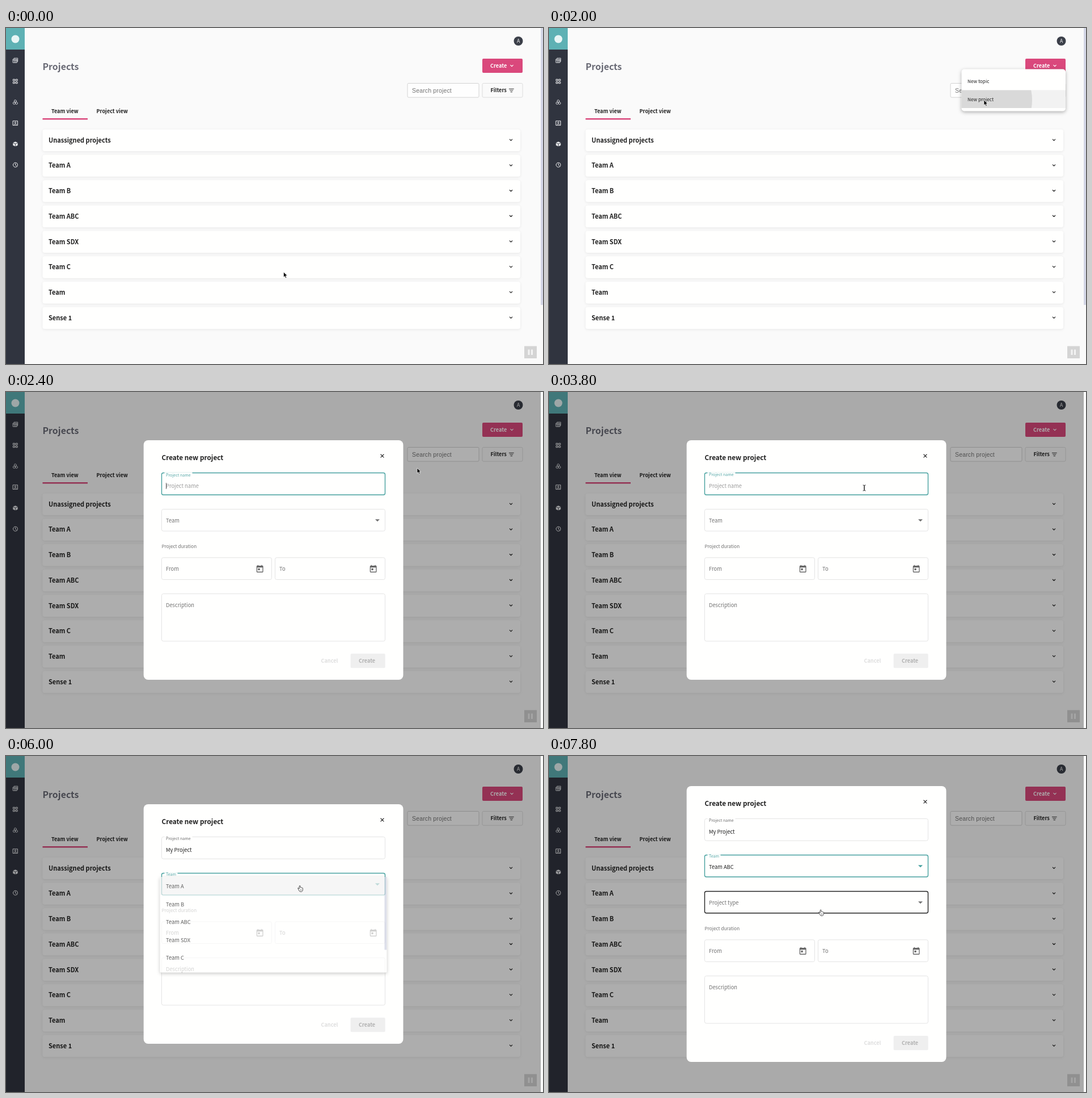
An HTML page that plays this animation: 947x592 px, repeating every 8 s.

```html
<!DOCTYPE html>
<html lang="en">
<head>
<meta charset="utf-8">
<title>Create new project</title>
<style>
  html, body { margin: 0; width: 100%; height: 100%; overflow: hidden; background: #fafafa; }
  svg { display: block; width: 947px; height: 592px; }
  text { font-family: "Noto Sans CJK JP", "Noto Sans CJK SC", "Noto Sans CJK", "Noto Sans", sans-serif; white-space: pre; }
  .search { font-family: "Liberation Sans", Arial, sans-serif; letter-spacing: .15px; }
  .row { fill: #fffffe; filter: drop-shadow(0 1.5px 2px rgba(0, 0, 0, .08)); }
  .popup { fill: #fffffe; filter: drop-shadow(0 2px 3px rgba(0, 0, 0, .3)); }
  .line { fill: none; stroke-linecap: round; stroke-linejoin: round; }
</style>
</head>
<body>
<svg viewBox="0 0 947 592">
  <defs>
    <clipPath id="menuRow"><rect x="727.5" y="109.5" width="183.5" height="31.5"/></clipPath>
    <clipPath id="listRow"><rect x="271.5" y="276.5" width="396" height="31.5"/></clipPath>
    <clipPath id="button"><rect x="840" y="54" width="71" height="25" rx="2"/></clipPath>
  </defs>
  <g id="page"></g>
  <g id="scene"></g>
</svg>
<script>
const STEP = 200, LOOP = 8000;
const PINK = '#da487c', TEAL = '#45a09e', INK = '#202020', GREY = '#717171';

const text = (x, y, str, size, fill = INK, weight = 400, extra = '') =>
  `<text x="${x}" y="${y + size * .37}" font-size="${size}" fill="${fill}" font-weight="${weight}" ${extra}>${str}</text>`;
const box = (x, y, w, h, fill, r = 0, extra = '') =>
  `<rect x="${x}" y="${y}" width="${w}" height="${h}" rx="${r}" fill="${fill}" ${extra}/>`;
const line = (d, color, width = 1) =>
  `<path class="line" d="${d}" stroke="${color}" stroke-width="${width}"/>`;
const at = (x, y, inner, scale = 1) =>
  `<g transform="translate(${x} ${y}) scale(${scale})">${inner}</g>`;
const group = (inner, attrs) => `<g ${attrs}>${inner}</g>`;
const chevron = (x, y, color) => line(`M${x - 2.2} ${y - 1.1}l2.2 2.2l2.2-2.2`, color, 1.2);

// Sidebar icons, each drawn around its own centre
const hex = (x, y) => `M${x} ${y - 2}l1.8 1v2l-1.8 1l-1.8-1v-2z`;
const icons = [
  line('M-4-2.2h6.8v6H-4zM-2.4-2.4v-1.7h6.6v6h-1.4M-4-.4h6.8M-1.7-.4v4M.6-.4v4', '#e4e5e8', .9),
  line('M-3.7-3.7h2.7v2.7h-2.7zM1-3.7h2.7v2.7h-2.7zM-3.7 1h2.7v2.7h-2.7zM1 1h2.7v2.7h-2.7z', '#f0f0f2', 1),
  line(hex(0, -2) + hex(-2.1, 1.8) + hex(2.1, 1.8), '#e4e5e8', .9),
  line('M-4-3.8h8v7.6h-8zM-2.2 2.2q2.2-2 4.4 0M-1.2-1a1.2 1.2 0 1 0 2.4 0a1.2 1.2 0 1 0-2.4 0', '#f0f0f2', 1),
  '<path d="M0-4.2l4.2 1.8L0-.6l-4.2-1.8zM-4.2-1.6l3.8 1.7v4l-3.8-1.8zM4.2-1.6L.4.1v4l3.8-1.8z" fill="#e8e9eb"/>',
  line('M-4 0a4 4 0 1 0 8 0a4 4 0 1 0-8 0M0-2.3V.2l1.6 1', '#f0f0f2', 1),
];

const teams = ['Unassigned projects', 'Team A', 'Team B', 'Team ABC', 'Team SDX', 'Team C', 'Team', 'Sense 1'];

const drawPage = () => [
  box(0, 0, 947, 592, '#fafafa'),
  box(0, 0, 33, 592, '#30343f'),
  box(0, 0, 33, 38, '#5eb1b4'),
  '<circle cx="16.5" cy="19.5" r="7" fill="#e8f5f5"/>',
  ...icons.map((icon, i) => at(16.5, 57.2 + i * 36.8, icon)),
  '<circle cx="903.5" cy="23" r="8" fill="#3b3f49"/>',
  text(903.5, 23.2, 'A', 8.5, '#fff', 400, 'text-anchor="middle"'),
  text(64.5, 68.3, 'Projects', 15.9, '#696a75', 600),
  box(840, 54, 71, 25, PINK, 2),
  text(854, 66.5, 'Create', 9.15, '#fff', 600),
  chevron(892, 66.5, '#fff'),
  box(708, 97.5, 126, 24.7, '#fefefe', 2, 'stroke="#c9c9c9" stroke-width=".8"'),
  text(716, 110, 'Search project', 10.52, '#757575', 400, 'class="search"'),
  box(840, 97.5, 71, 24.7, '#fafafa', 2, 'stroke="#d6d6d6" stroke-width=".8"'),
  text(854.5, 110, 'Filters', 9.1, INK, 600),
  line('M887.3 107.3h8M888.7 110h5.2M890 112.7h2.6', INK, .9),
  text(80, 146.5, 'Team view', 9.15, INK, 600),
  text(159.5, 146.5, 'Project view', 9.1, INK, 600),
  box(64.5, 159, 79.5, 2.5, PINK),
  ...teams.map((name, i) => {
    const y = 197.7 + i * 44.72;
    return box(64.5, y - 19, 842.5, 38.4, '#fffffe', 4, 'class="row"') +
      text(75, y, name, 11, INK, 600) + chevron(890.5, y - .5, INK);
  }),
  box(914, 560.5, 22, 21.5, '#d4d4d4'),
  box(920.5, 566.5, 3, 9.5, '#f3f3f3') + box(926, 566.5, 3, 9.5, '#f3f3f3'),
].join('');

const ripple = (x, y, r, clip) =>
  `<circle cx="${x}" cy="${y}" r="${r}" fill="#000" opacity=".1" clip-path="url(#${clip})"/>`;

function menu(f) {
  if (f < 7 || f > 11) return '';
  const opacity = f === 7 ? .75 : f === 11 ? .06 : 1;
  return group(
    box(727.5, 72.5, 183.5, 74, '#fffffe', 5, 'class="popup"') +
    (f >= 9 ? box(727.5, 109.5, 183.5, 31.5, '#f2f2f2') : '') +
    (f === 10 ? ripple(767, 127, 85, 'menuRow') : '') +
    text(738, 94, 'New topic', 8.2) + text(738, 125.5, 'New project', 8.2),
    `opacity="${opacity}"`);
}

const dropArrow = (y, color) => `<path d="M651 ${y}h8l-4 4z" fill="${color}"/>`;
const calendar = (x, y) => at(x - 7.9, y - 7.9,
  '<path fill="#666" d="M19 3h-1V1h-2v2H8V1H6v2H5a2 2 0 0 0-2 2v14a2 2 0 0 0 2 2h14a2 2 0 0 0 2-2V5a2 2 0 0 0-2-2zm0 16H5V8h14v11zM7 10h5v5H7z"/>', .6576);

// Outlined input; a floated label cuts a notch into the top border
function field(x, y, w, h, label, { state = '', float = 0, notch = 0, labelY = 20.2 } = {}) {
  const stroke = { focus: TEAL, hover: '#222' }[state] || '#dedede';
  return box(x, y, w, h, 'none', 3, `stroke="${stroke}" stroke-width="${state ? 1.4 : .8}"`) +
    (float
      ? box(x + 5, y - 1, notch, 2.4, '#fffffe') + text(x + 7.5, y + float, label, 7.06, state ? '#58a9a9' : GREY)
      : text(x + 7.5, y + labelY, label, 9.35, GREY));
}

function typed(f) {
  return 'My Project'.slice(0, f < 21 ? 0 : f < 26 ? 1 + 2 * (f - 21) : 10);
}

function nameField(f) {
  if (f < 12) return field(274.5, 142.5, 394, 38.5, 'Project name');
  const focus = f < 30, value = typed(f);
  const caretOn = focus && !(f >= 14 && f < 17) && f !== 19 && f !== 20;
  const caret = caretOn ? `<tspan fill="#6aa5a8" dx="-1">|</tspan>` : '';
  return field(274.5, 142.5, 394, 38.7, 'Project name', { state: focus ? 'focus' : '', float: f === 12 ? 3.7 : 2.7, notch: 49 }) +
    (value
      ? text(282, 165.5, value + caret, 9.35)
      : text(282, 165.5, 'Project name', 9.35, '#9b9b9b') + (caretOn ? box(282, 160, .8, 11, '#444') : ''));
}

function teamField(f) {
  const focus = f >= 30, chosen = f >= 36;
  return field(274.5, 206.5, 394, 38.5, 'Team', {
    state: focus ? 'focus' : f === 29 ? 'hover' : '',
    float: focus ? 2 : 0, notch: 23,
  }) + (chosen ? text(282, 227.2, 'Team ABC', 9.35) : '') + dropArrow(224.3, focus ? TEAL : GREY);
}

function dialog(f) {
  if (f < 11) return '';
  const grow = f >= 36 ? 32 : 0;
  const upper = text(274.5, 116, 'Create new project', 11.75, INK, 600) +
    line('M660.9 110l5.2 5.2m0-5.2l-5.2 5.2', INK, 1.1) + nameField(f) + teamField(f);
  const typeField = grow
    ? field(274.5, 238.5, 394, 38.3, 'Project type', { state: f >= 38 ? 'hover' : '' }) + dropArrow(256.3, GREY) : '';
  const lower = text(274.5, 271.7, 'Project duration', 8.2, GREY) +
    field(274.5, 291.8, 194, 38.7, 'From') + calendar(447.7, 312) +
    field(474.5, 291.8, 194, 38.7, 'To') + calendar(647.7, 312) +
    field(274.5, 355.5, 394, 83.5, 'Description') +
    text(555.5, 473.7, 'Cancel', 9.1, '#dedede', 600) +
    box(607.7, 461, 61, 25.2, '#efefef', 2) + text(622, 473.7, 'Create', 9.1, '#b0b0b0', 600);
  const scale = f === 11 ? .99 : 1;
  return box(0, 0, 943, 592, '#000', 0, `opacity="${f === 11 ? .235 : .32}"`) +
    box(943, 0, 4, 592, '#fafafa') +
    group(
      box(242.7, 85 - grow, 457.8, 422 + 2 * grow, '#fffffe', 8) +
      at(0, -grow, upper) + typeField + at(0, grow, lower),
      `transform="translate(471.5 296) scale(${scale}) translate(-471.5 -296)"`);
}

function dropdown(f) {
  if (f < 30 || f > 35) return '';
  const hover = f === 31 ? 1 : f > 31 ? 2 : 0;
  const rowBg = i => box(271.5, 213.3 + i * 31.6, 396, 31.5, '#f3f3f3');
  return group(
    box(271.5, 213, 400, 168.5, '#fffffe', 2, 'class="popup"') + rowBg(0) + (hover ? rowBg(hover) : '') +
    (f >= 34 ? ripple(498, 294.5, f === 34 ? 20 : 54.5, 'listRow') : '') +
    teams.slice(1, 6).map((name, i) => text(282, 229.5 + i * 31.6, name, 9.35)).join('') +
    box(667.5, 213, 4, 128.5, '#cfd2e2'),
    `opacity="${f === 30 ? .7 : 1}"`);
}

const pointers = {
  arrow: '<path d="M0 0v9.2l2.1-2l1.5 3.3l1.6-.7l-1.4-3.2h2.9z" fill="#000" stroke="#fff" stroke-width=".7"/>',
  beam: line('M-2-5q2 0 2 1.2v7.6q0 1.2-2 1.2M2-5q-2 0-2 1.2v7.6q0 1.2 2 1.2', '#222', 1),
  hand: '<path d="M-.8 1V6l-1.3-1.4q-1-.6-1.3.3l2.2 4.2q.8 1.9 2.2 1.9h2.4q1.7-.5 1.9-3V4.8q-.4-.9-1.3-.4q-.5-.8-1.4-.4q-.6-.7-1.5-.3V1Q.2-.2-.8 1z" fill="#fff" stroke="#222" stroke-width=".8" stroke-linejoin="round"/>' +
    line('M1.2 7.2v1.8M2.8 7.2v1.8', '#222', .5),
};

// [step, x, y, pointer from here on]
const path = [
  [0, 489.5, 430, 'arrow'], [5, 868, 72, 'hand'], [7, 872, 68, 'arrow'], [9, 767, 127, 'arrow'],
  [11, 767, 127, 'arrow'], [12, 725, 134, 'arrow'], [14, 556, 169, 'beam'], [26, 556, 169, 'beam'],
  [28, 540, 204, 'arrow'], [29, 520, 225, 'hand'], [30, 518, 228, 'hand'], [32, 498, 294.5, 'hand'],
  [36, 498, 294.5, 'arrow'], [38, 484, 273, 'hand'], [39, 479, 270.5, 'hand'], [40, 479, 270.5, 'hand'],
];

function pointer(f) {
  if (f >= 21 && f < 26) return '';
  const i = path.findIndex(([step], n) => n && f < step) - 1;
  const [s0, x0, y0, shape] = path[i], [s1, x1, y1] = path[i + 1];
  const u = (f - s0) / (s1 - s0), k = u * u * (3 - 2 * u);
  return at(x0 + (x1 - x0) * k, y0 + (y1 - y0) * k, pointers[shape]);
}

function drawScene(f) {
  return (f < 11 ? box(943, 0, 4, 488, '#d3d6e6', 1) : '') +
    (f === 6 ? ripple(872, 70, 30, 'button') : '') +
    dialog(f) + menu(f) + dropdown(f) + pointer(f);
}

const scene = document.getElementById('scene');
document.getElementById('page').innerHTML = drawPage();
let shown = -1;
function tick() {
  const f = Math.floor(performance.now() % LOOP / STEP);
  if (f !== shown) scene.innerHTML = drawScene(shown = f);
  requestAnimationFrame(tick);
}
tick();
</script>
</body>
</html>
```
